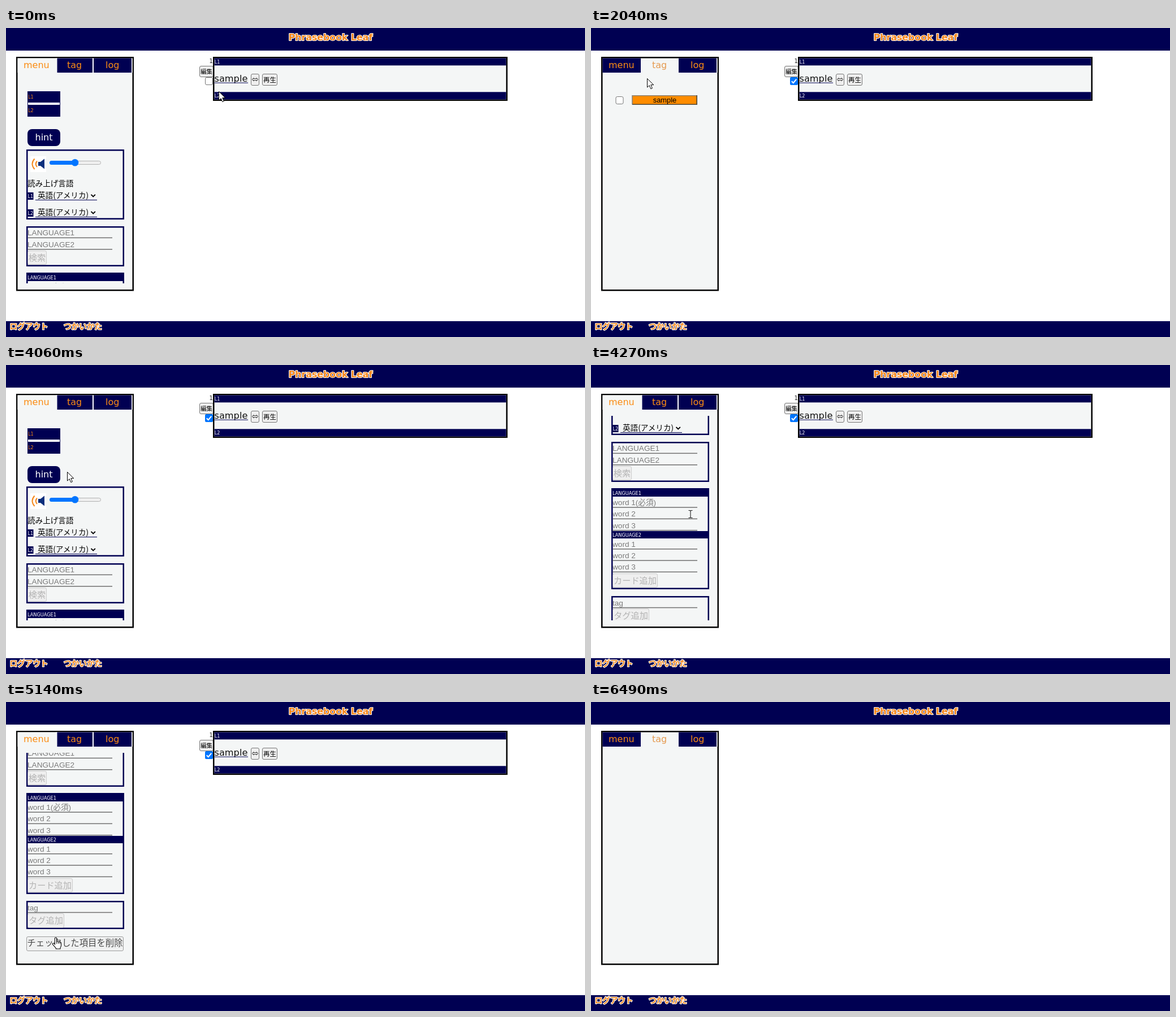
Animation of 1024 by 547 pixels, one loop 6.63 s. Source, as an HTML page:

```html
<!DOCTYPE html>
<html lang="ja">
<head>
<meta charset="utf-8">
<title>Phrasebook Leaf</title>
<style>
html, body { margin: 0; width: 100%; height: 100%; overflow: hidden; background: #fff; }
svg { display: block; }
text { font-family: "DejaVu Sans", "Noto Sans CJK JP", "Noto Sans CJK", sans-serif; }
.ja { font-family: "Noto Sans CJK JP", "Noto Sans CJK", sans-serif; }
.field { font-family: "Liberation Sans", "Noto Sans CJK JP", "Noto Sans CJK", sans-serif; }
.glow { font-weight: 700; fill: #f7861a; stroke: #fff; stroke-width: 2.2; stroke-linejoin: round; paint-order: stroke; }
</style>
</head>
<body>
<svg id="stage" width="1024" height="547" viewBox="0 0 1024 547"></svg>
<script>
const LOOP = 6630, STEP = 1000 / 15;
const NAVY = '#000052', PALE = '#f4f6f6', ORANGE = '#fb8c14', BLUE = '#0075ff', GRAY = '#767676';

const rect = (x, y, w, h, fill, more = '') =>
  `<rect x="${x}" y="${y}" width="${w}" height="${h}" fill="${fill}" ${more}/>`;
const text = (x, y, str, size, fill, more = '') =>
  `<text x="${x}" y="${y}" font-size="${size}" fill="${fill}" ${more}>${str}</text>`;
const path = (d, stroke, width, fill = 'none') =>
  `<path d="${d}" fill="${fill}" stroke="${stroke}" stroke-width="${width}"/>`;
const group = (id, body, more = '') => `<g id="${id}" ${more}>${body}</g>`;

// Outer bounds with the border drawn inside
const frame = (x, y, w, h, color, fill = PALE, b = 2.5) =>
  rect(x + b / 2, y + b / 2, w - b, h - b, fill, `stroke="${color}" stroke-width="${b}"`);

const button = (x, y, w, h, label, size, base, off) =>
  rect(x + .5, y + .5, w - 1, h - 1, '#efefef',
    `rx="2.5" stroke="${GRAY}" ${off ? 'stroke-opacity=".3"' : ''}`) +
  text(x + w / 2, base, label, size, off ? '#b3b3b3' : '#000', 'class="ja" text-anchor="middle"');

const field = (base, label) =>
  text(38, base, label, 13.6, '#7b7b7b', 'class="field"') + rect(38, base + 3.3, 150, 1.5, '#707070');

const bar = (y, h, label) => rect(36, y, 173, h, NAVY) + text(38, y + h - 3.3, label, 8.2, '#fff');

const checkbox = (id, x, y) =>
  rect(x + .5, y + .5, 13, 13, '#fff', `rx="2.5" stroke="${GRAY}"`) +
  group(id, rect(x, y, 14, 14, BLUE, 'rx="2.5"') +
    path(`M${x + 2.8} ${y + 7.2}l3 3l5.5-6.6`, '#fff', 2));

const voice = (y, tag) =>
  rect(38, y, 10.5, 13, NAVY) + text(38.5, y + 9.7, tag, 8, '#fff') +
  text(56, y + 10, '英語(アメリカ)', 13.6, '#000', 'class="ja"') +
  path(`M150.5 ${y + 3.8}l3.7 3.7l3.7-3.7`, '#000', 1.9) + rect(52, y + 13, 109, 1, NAVY);

const speaker = rect(43, 227, 28, 28, '#fff') +
  path('M57 237h4l7-5.5v18l-7-5.5h-4z', 'none', 0, '#0b2f7c') +
  path('M55 235.5q-4.5 5 0 10.5', '#f58a1f', 2) +
  path('M50.5 231.5q-8 9 0 18.5', '#f58a1f', 2);

const slider = rect(77.5, 235.5, 90, 6, '#efefef', 'rx="3" stroke="#b2b2b2"') +
  rect(77, 235, 45, 7, BLUE, 'rx="3.5"') + `<circle cx="122" cy="238.3" r="6.3" fill="${BLUE}"/>`;

const menuBody =
  rect(38, 112, 58, 45, NAVY) + rect(39, 132, 56, 4, '#fff') +
  text(39, 125, 'L1', 8, ORANGE) + text(39, 149, 'L2', 8, ORANGE) +
  rect(38, 179, 58, 30, NAVY, 'rx="8"') + text(51.5, 199, 'hint', 16, '#fff') +
  frame(36, 215, 173, 124, NAVY) + speaker + slider +
  text(38, 280.3, '読み上げ言語', 13.6, '#000', 'class="ja"') +
  voice(291, 'L1') + voice(321, 'L2') +
  frame(36, 351, 173, 71, NAVY) + field(367.3, 'LANGUAGE1') + field(387.7, 'LANGUAGE2') +
  button(38, 394, 34, 25, '検索', 15.2, 411.5, true) +
  frame(36, 433, 173, 179, NAVY) + bar(433, 15, 'LANGUAGE1') + bar(509, 13, 'LANGUAGE2') +
  ['word 1(必須)', 'word 2', 'word 3'].map((s, i) => field(463 + i * 20.3, s)).join('') +
  [1, 2, 3].map((n, i) => field(536.7 + i * 20.3, 'word ' + n)).join('') +
  button(38, 584, 80, 25, 'カード追加', 15.2, 601.5, true) +
  frame(36, 624, 173, 50, NAVY) + field(640.5, 'tag') +
  button(38, 646, 65, 26, 'タグ追加', 15.2, 664, true) +
  group('remove', button(36, 687, 172, 26, 'チェックした項目を削除', 15.4, 704.3));

const tagBody = checkbox('tagTick', 43.5, 121) +
  group('tagName', rect(73, 119, 115, 17, '#ff8c00') +
    path('M73 135.5V119.8H188', '#8a8378', 1.6) +
    path('M73 135.2H187.2V119', '#4a4a42', 1.6) +
    text(130.5, 132.3, 'sample', 12.9, '#000', 'class="field" text-anchor="middle"'));

const tab = (x, label, fill = ORANGE) => text(x, 71, label, 16, fill);
const menuTabs = rect(88, 53.5, 67, 25.5, '#fff') + rect(20.5, 53.5, 70, 25.5, PALE) +
  rect(90.5, 53.5, 62.5, 25.5, NAVY) + tab(31, 'menu') + tab(108, 'tag');
const tagTabs = rect(20.5, 53.5, 67.5, 25.5, NAVY) + tab(31, 'menu') + tab(108, 'tag', '#e59a50');

const card =
  text(359.5, 62, '1', 10, '#222') + button(342, 67, 25, 20, '編集', 10.6, 81) +
  checkbox('cardTick', 352, 87) +
  frame(366, 51, 521, 78, '#000') + rect(368.5, 53.5, 516, 12.8, NAVY) + rect(368.5, 113.3, 516, 13.2, NAVY) +
  text(368.7, 62.7, 'L1', 8, '#fff') + text(368.7, 122.7, 'L2', 8, '#fff') +
  text(368.5, 95, 'sample', 16.2, '#111') + rect(368.5, 96.6, 59.5, 1, NAVY) +
  button(433, 81, 15, 21, '', 11, 95) + path('M437 89.6h7M437 92.6h7M438.3 88l-3 3.1l3 3.1M442.7 88l3 3.1l-3 3.1', '#222', .9) +
  button(453, 81, 27, 21, '再生', 11.4, 95.5);

const pointers =
  group('arrow', path('M.5 .5V16l3.7-3.3l2.6 6l2.6-1.1l-2.6-5.9h5z', '#000', 1, '#fff')) +
  group('hand', path('M-1.6 1.6a1.6 1.6 0 0 1 3.2 0V7.2q1.5-1 3 .3q1.6-.7 2.8.6q1.8-.3 2.1 1.4V14q0 2-1.5 4v2H.3v-1.4Q-2 16-5.2 12.4q-1-1.7.5-2.4q1.5-.3 3.1 1.8z', '#000', 1.1, '#fff') +
    path('M1.6 7v4M4.6 7.5v3.5M7.3 8.2v3', '#000', .9)) +
  group('beam', path('M-3.5-6.5h2.5l1 1l1-1h2.5M0-5.5v11M-3.5 6.5h2.5l1-1l1 1h2.5', '#222', 1.1));

document.getElementById('stage').innerHTML =
  `<clipPath id="view"><rect x="20" y="90" width="203" height="362"/></clipPath>` +
  rect(0, 0, 1024, 40, NAVY) + rect(0, 519, 1024, 28, NAVY) +
  text(574, 22, 'Phrasebook Leaf', 15.8, '', 'class="glow" text-anchor="middle"') +
  text(6.5, 533, 'ログアウト', 13.6, '', 'class="ja glow"') +
  text(102, 533, 'つかいかた', 13.6, '', 'class="ja glow"') +
  frame(18, 51, 208, 414.5, '#000') +
  rect(155, 53.5, 67, 25.5, NAVY) + rect(222, 53.5, 1.5, 25.5, '#fff') + tab(176, 'log') +
  group('menuPage', menuTabs + `<g clip-path="url(#view)">${group('scroller', menuBody)}</g>`) +
  group('tagPage', tagTabs + group('tagList', tagBody)) +
  group('card', card) + group('pointer', pointers);

// time, x, y, pointer shape from that time on
const moves = [
  [0, 376, 112, 'arrow'], [65, 376, 112, 'arrow'], [265, 361, 93, 'arrow'],
  [460, 361, 93, 'arrow'], [530, 360, 94, 'arrow'], [880, 360, 94, 'arrow'],
  [1060, 262, 80, 'arrow'], [1200, 182, 63, 'hand'], [1333, 123, 60, 'hand'],
  [1700, 123, 60, 'hand'], [1930, 108, 84, 'arrow'], [2380, 50, 119, 'hand'],
  [2440, 50, 119, 'hand'], [2780, 47, 123, 'hand'], [2930, 47, 123, 'hand'],
  [3130, 74, 134, 'hand'], [3200, 66, 115, 'arrow'], [3400, 34, 62, 'hand'],
  [3530, 24, 47, 'hand'], [3600, 24, 47, 'hand'], [3665, 36, 56, 'hand'],
  [3800, 36, 56, 'hand'], [3900, 70, 125, 'arrow'], [4060, 131, 228, 'arrow'],
  [4200, 174, 262, 'beam'], [4400, 179, 267, 'beam'], [4530, 179, 284, 'beam'],
  [4600, 179, 287, 'beam'], [4800, 148, 355, 'arrow'], [5060, 95, 416, 'hand'],
  [5260, 77, 420, 'hand'], [5340, 77, 427, 'hand'], [5530, 77, 427, 'arrow'],
  [5690, 77, 427, 'arrow'], [5860, 105, 200, 'arrow'], [5960, 120, 64, 'hand'],
  [6180, 121, 63, 'hand'], [6260, 190, 90, 'arrow'], [6420, 318, 130, 'arrow'], [6630, 318, 130, 'arrow']
];

const el = id => document.getElementById(id);
const show = (id, on) => { el(id).style.display = on ? '' : 'none'; };
const fade = (id, on) => el(id).setAttribute('opacity', on ? .7 : 1);
const between = (t, a, b) => t >= a && t < b;

function draw(ms) {
  const t = Math.floor((ms % LOOP) / STEP + .02) * STEP;
  const onTag = between(t, 1525, 3660) || t >= 6120;
  const deleted = t >= 5520;

  show('menuPage', !onTag);
  show('tagPage', onTag);
  show('tagList', !deleted);
  show('card', !deleted);
  show('cardTick', t >= 260);
  show('tagTick', t >= 2590);
  fade('tagName', between(t, 3060, 3190));
  fade('remove', between(t, 5060, 5520));

  const p = Math.min(1, Math.max(0, (t - 4120) / 270));
  const scroll = deleted ? 0 : 272 * (1 - (1 - p) ** 2);
  el('scroller').setAttribute('transform', `translate(0 ${-Math.round(scroll)})`);

  const i = moves.findLastIndex(m => m[0] <= t);
  const a = moves[i], b = moves[i + 1] || a;
  const k = (t - a[0]) / (b[0] - a[0] || 1);
  const at = n => Math.round(a[n] + (b[n] - a[n]) * k);
  el('pointer').setAttribute('transform', `translate(${at(1)} ${at(2)})`);
  show('pointer', t < 6460);
  for (const id of ['arrow', 'hand', 'beam']) show(id, id === a[3]);
}

const start = performance.now();
function tick() {
  draw(performance.now() - start);
  requestAnimationFrame(tick);
}
tick();
</script>
</body>
</html>
```
